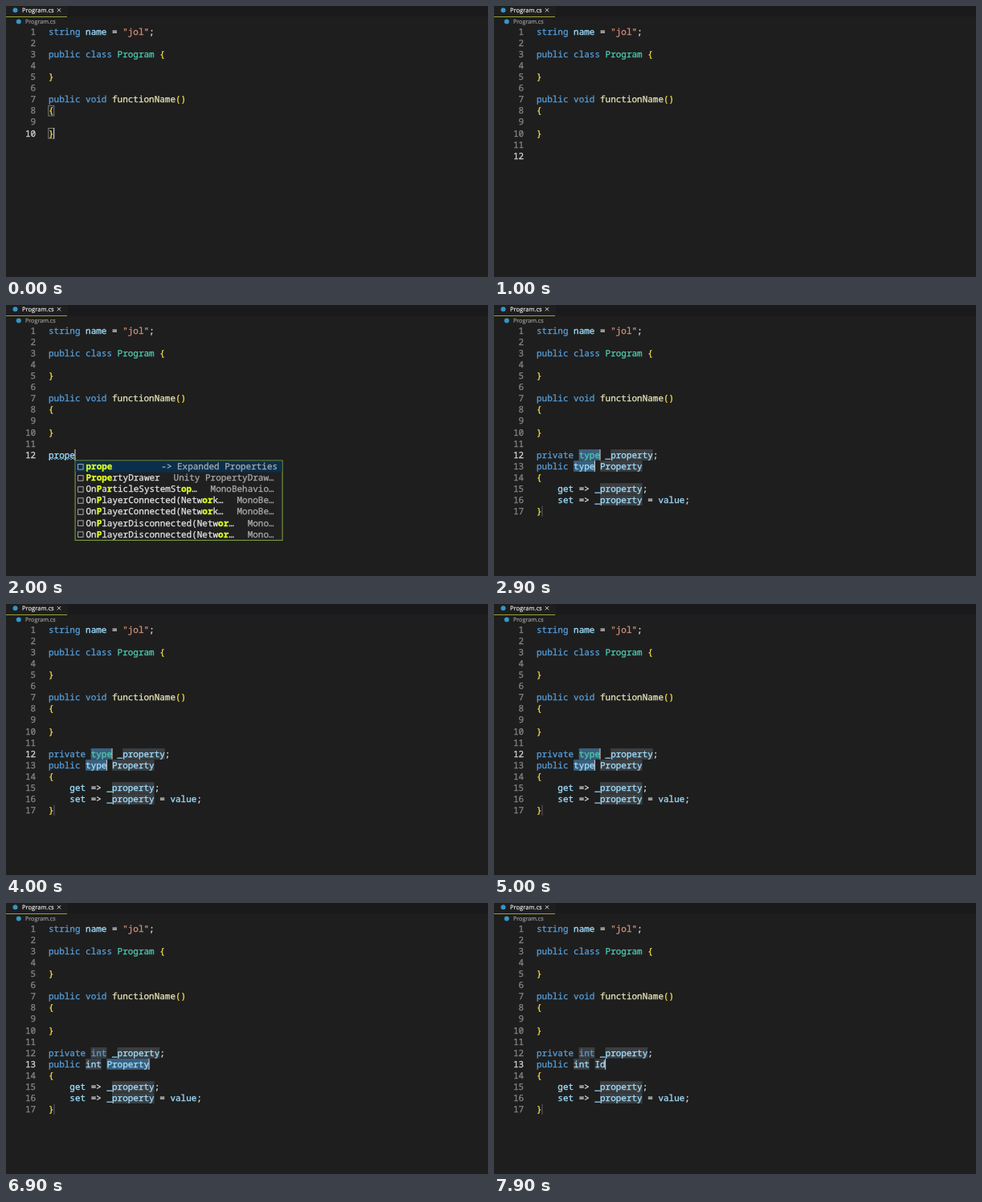
An HTML page for the animation above (8000 ms loop, 600 px wide and 338 px high).

```html
<!DOCTYPE html>
<html lang="en">
<head>
<meta charset="utf-8">
<title>Code editor</title>
<style>
  html, body { margin: 0; width: 100%; height: 100%; overflow: hidden; background: #1e1e1e; }
  svg { display: block; width: 600px; height: 338px; }
  text { white-space: pre; text-rendering: geometricPrecision; }
  .mono { font: 10.97px "Noto Sans Mono", "DejaVu Sans Mono", monospace; stroke-width: .3px; }
  .ui { font-family: "Open Sans", "Noto Sans", sans-serif; stroke-width: .15px; }
</style>
</head>
<body>
<svg id="stage" viewBox="0 0 600 338" xmlns="http://www.w3.org/2000/svg"></svg>
<script>
const LOOP = 8000, X0 = 53, CW = 6.58, LH = 14.06, TOP = 25.2;
const C = {
  key: '#569cd6', name: '#9fdfff', text: '#d8d8d8', str: '#ce9178', type: '#4ec9b0',
  fn: '#e4e2b4', brace: '#f7de45', num: '#858585', numOn: '#d4d4d4', caret: '#c8c8c6',
  sel: '#3a607e', mark: '#3b3e41', soft: '#333537', hit: '#deff1f', edge: '#86ab45',
  icon: '#3596c8'
};
const KEYS = /^(string|public|private|class|void|int)$/;

const BASE = [
  'string name = "jol";', '', 'public class Program {', '', '}', '',
  'public void functionName()', '{', '', '}'
];

// Square brackets mark matched letters; a trailing ellipsis marks cut text.
const WIDE = [
  ['[pro]p', 'prop'],
  ['[pro]p', '-> Properties'],
  ['[pro]pe', '-> Expanded Properties'],
  ['[pro]pfull', 'Property and backing fi…'],
  ['[pro]pg', 'propg'],
  ['[Pro]pertyDrawer', 'Unity PropertyDraw…'],
  ['On[Pro]jectChang…', 'EditorWindow OnPr…'],
  ['On[Po]st[R]ender…', 'MonoBehaviour OnPos…'],
  ['On[Po]st[R]ender…', 'MonoBehaviour OnPos…'],
  ['On[P]laye[r]C[o]nnected(Network…', 'MonoBe…'],
  ['On[P]laye[r]C[o]nnected(Network…', 'MonoBe…'],
  ['On[P]laye[r]Disc[o]nnected(Networ…', 'Mono…']
];
const MID = WIDE.slice(0, 6).map(([a, b]) => [a.replace(/\[([Pp]ro)\]p/, '[$1p]'), b]);
const NARROW = [
  ['[prope]', '-> Expanded Properties'],
  ['[Prope]rtyDrawer', 'Unity PropertyDraw…'],
  ['On[P]a[r]ticleSystemSt[op]…', 'MonoBehavio…'],
  ['On[P]layerConnected(Netw[or]k…', 'MonoBe…'],
  ['On[P]layerConnected(Netw[or]k…', 'MonoBe…'],
  ['On[P]layerDisconnected(Netw[or]…', 'Mono…'],
  ['On[P]layerDisconnected(Netw[or]…', 'Mono…']
];

// Keystrokes: time, phase, typed text
const STEPS = [
  [0, 'start', ''], [200, 'enter', ''], [400, 'word', ''],
  [1200, 'word', 'p'], [1300, 'word', 'pr'], [1400, 'word', 'pro'],
  [1500, 'word', 'prop'], [1700, 'word', 'prope'],
  [2500, 'type', 'type'], [5100, 'type', 'i'], [5300, 'type', 'in'], [5500, 'type', 'int'],
  [5800, 'name', 'Property'], [7100, 'name', 'I'], [7500, 'name', 'Id']
];

const esc = s => s.replace(/&/g, '&amp;').replace(/</g, '&lt;').replace(/>/g, '&gt;');
const colX = c => X0 + c * CW;
const rowY = r => TOP + (r - 1) * LH;
const rect = (x, y, w, h, fill, more = '') =>
  `<rect x="${x}" y="${y}" width="${w}" height="${h}" fill="${fill}" ${more}/>`;
const dot = (x, y) => `<circle cx="${x}" cy="${y}" r="3" fill="${C.icon}"/>`;
const span = (s, color, more = '') =>
  `<tspan fill="${color}" stroke="${color}" ${more}>${esc(s)}</tspan>`;
const mono = (x, y, body, more = '') => `<text class="mono" x="${x}" y="${y}" ${more}>${body}</text>`;
const ui = (x, y, size, color, s) =>
  `<text class="ui" x="${x}" y="${y}" font-size="${size}">${span(s, color)}</text>`;
const fillCols = (row, from, len, color) =>
  rect(colX(from), rowY(row) + .2, len * CW, LH - .4, color);
const caretAt = (row, col) => rect(colX(col) - .5, rowY(row) + .2, 1.1, LH - .4, C.caret);

function tokenColor(s, row, i) {
  if (row === 13 && i > 0) return C.name;
  if (KEYS.test(s)) return C.key;
  if (s[0] === '"') return C.str;
  if (/^[{}()]$/.test(s)) return C.brace;
  if (s === 'functionName') return C.fn;
  if (s === 'Program' || (row === 12 && /^(type|in?)$/.test(s))) return C.type;
  return /\w/.test(s) ? C.name : C.text;
}

function codeLine(s, row) {
  const parts = s.match(/"[^"]*"|\w+|[{}()]|\s+|[^\w\s{}()"]+/g) || [];
  return mono(X0, rowY(row) + 10.8, parts.map((p, i) => span(p, tokenColor(p, row, i))).join(''));
}

function header() {
  return rect(0, 0, 600, 13, '#1a1a1d') + rect(0, 0, 77, 13, '#1e1e1e') +
    rect(0, 13, 76, 1, '#98a136') +
    dot(11.5, 5.3) + ui(20, 8, 7.58, '#f0f0f0', 'Program.cs') +
    '<path d="M63.8 3l4.4 4.4m0-4.4l-4.4 4.4" stroke="#dcdcdc" stroke-width=".9"/>' +
    dot(15.8, 19.6) + ui(24, 22.3, 7.2, '#a2a2a2', 'Program.cs');
}

function popup(x, list) {
  const y = 194, h = list.length * LH + 1;
  let out = rect(x, y, 258, h, '#202021', `stroke="${C.edge}"`) +
    rect(x + .5, y + .5, 257, LH, '#0a2f4d');
  list.forEach(([label, info], i) => {
    const top = y + .6 + i * LH, base = top + 10.6;
    const body = label.split(/[\[\]]/).map((p, k) =>
      k % 2 ? span(p, C.hit, 'font-weight="700"') : span(p, '#e2e2e2')).join('');
    const end = x + (info.endsWith('…') ? 247.5 : 252);
    out += rect(x + 3.5, top + 4, 6.5, 6.5, 'none', 'stroke="#b5b5b5" stroke-width=".9"') +
      mono(x + 13.4, base, body) +
      mono(end, base, span(info, '#a8a8a8'), 'text-anchor="end"');
  });
  if (list.length > 7) out += rect(x + 252, y + .5, 5, 127, '#474848');
  return out;
}

function squiggle(x, y, w) {
  let d = `M${x} ${y}`;
  for (let i = 0; i < w / 2; i++) d += `l2 ${i % 2 ? 2 : -2}`;
  return `<path d="${d}" fill="none" stroke="#5f9fc8" stroke-width=".9"/>`;
}

function build([, phase, typed], caretOn) {
  const lines = [...BASE], carets = [];
  let under = '', over = '', current = 12;

  if (phase === 'start') {
    current = 10;
    for (const r of [8, 10])
      under += rect(X0 - .2, rowY(r) + .7, CW + .4, LH - 1.4, 'none', 'stroke="#858585" stroke-width=".9"');
    carets.push([10, 1]);
  } else if (phase === 'enter') {
    current = 11;
    lines.push('');
    carets.push([11, 0]);
  } else if (phase === 'word') {
    const n = typed.length;
    lines.push('', typed);
    carets.push([12, n]);
    if (n) over += popup(colX(n) + .2, n < 4 ? WIDE : n < 5 ? MID : NARROW);
    if (n === 5) under += squiggle(X0, 193, n * CW);
  } else {
    const naming = phase === 'name';
    const type = naming ? 'int' : typed, prop = naming ? typed : 'Property';
    const n = type.length, fresh = naming ? typed === 'Property' : typed === 'type';
    lines.push('', `private ${type} _property;`, `public ${type} ${prop}`, '{',
      '    get => _property;', '    set => _property = value;', '}');
    const typeBg = !naming && fresh ? C.sel : naming ? C.mark : C.soft;
    const propBg = naming ? (fresh ? C.sel : C.soft) : C.mark;
    under += fillCols(12, 8, n, typeBg) + fillCols(13, 7, n, typeBg) +
      fillCols(12, 10 + n, 8, C.mark) + fillCols(13, 8 + n, prop.length, propBg) +
      fillCols(15, 12, 8, C.mark) + fillCols(16, 12, 8, C.mark) +
      rect(colX(1), rowY(17) + .4, .8, LH - .8, '#6a6a6a');
    if (naming) {
      current = 13;
      carets.push([13, 8 + n + prop.length]);
    } else carets.push([12, 8 + n], [13, 7 + n]);
  }

  const code = lines.map((s, i) => {
    const row = i + 1, color = row === current ? C.numOn : C.num;
    return mono(37.2, rowY(row) + 10.8, span(String(row), color), 'text-anchor="end"') + codeLine(s, row);
  }).join('');
  const bars = caretOn ? carets.map(c => caretAt(...c)).join('') : '';
  return rect(0, 0, 600, 338, '#1e1e1e') + header() + under + code + bars + over;
}

const stage = document.getElementById('stage');
let shown = '';

function frame() {
  const t = performance.now() % LOOP;
  let i = STEPS.length - 1;
  while (STEPS[i][0] > t) i--;
  const caretOn = (t - STEPS[i][0]) % 1020 < 520;
  const id = i + '/' + caretOn;
  if (id !== shown) {
    shown = id;
    stage.innerHTML = build(STEPS[i], caretOn);
  }
  requestAnimationFrame(frame);
}
frame();
</script>
</body>
</html>
```
